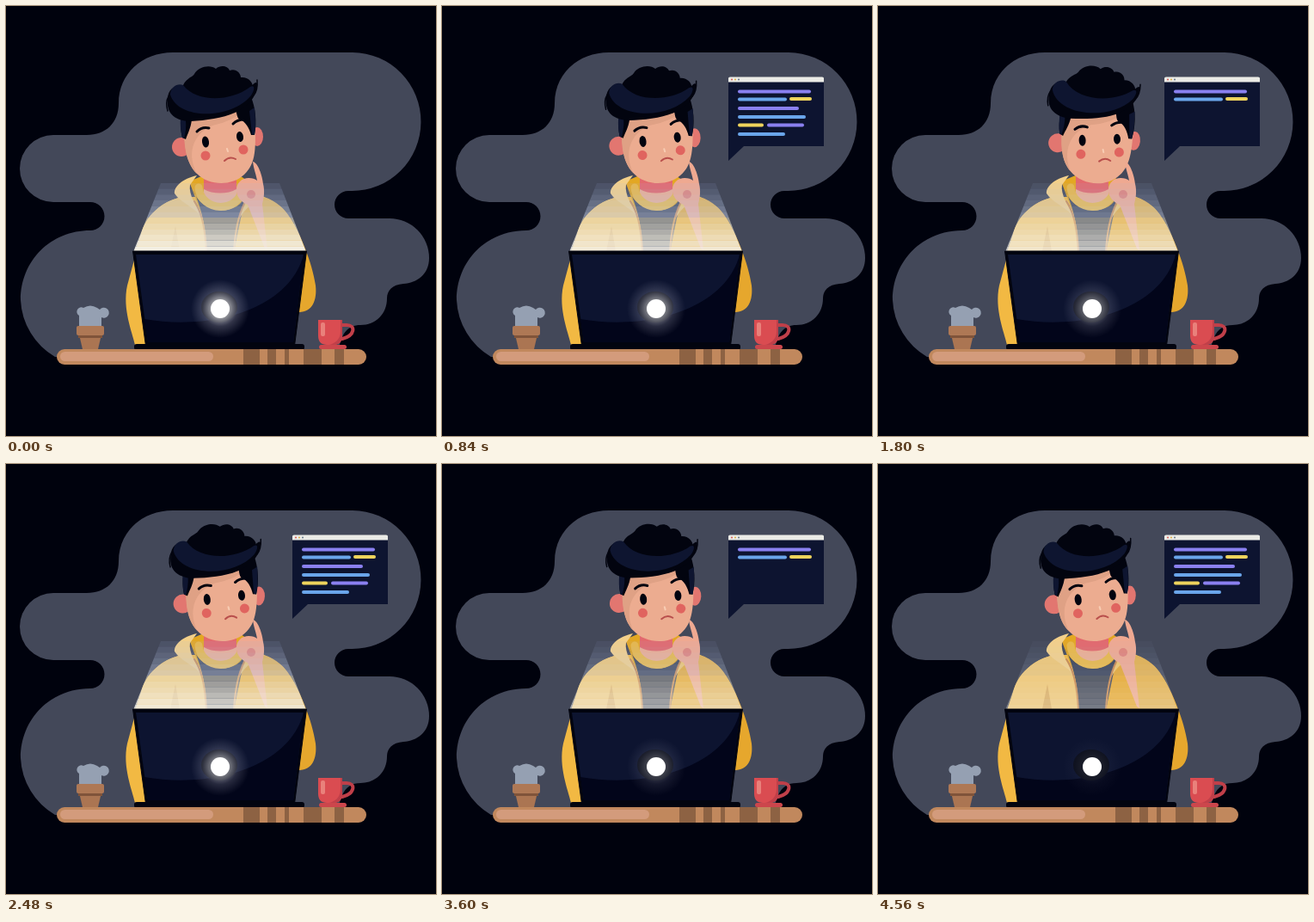
An HTML page for the animation above (4800 ms loop, 500 by 500 pixels).

```html
<!DOCTYPE html>
<html lang="en">
<head>
<meta charset="utf-8">
<title>Thinking at the laptop</title>
<style>
  html, body { margin: 0; width: 100%; height: 100%; overflow: hidden; background: #00020d; }
  svg { display: block; width: 100vw; height: 100vh; }
  .line { fill: none; stroke-linecap: round; }
</style>
</head>
<body>
<svg viewBox="0 0 500 500">
  <defs>
    <radialGradient id="halo">
      <stop offset=".3" stop-color="#fff" stop-opacity=".6"/>
      <stop offset=".6" stop-color="#dde" stop-opacity=".22"/>
      <stop offset="1" stop-color="#ccd" stop-opacity="0"/>
    </radialGradient>
    <clipPath id="cone"><path d="M180 206H318L349 286H148Z"/></clipPath>
  </defs>

  <path fill="#434859" d="M194 54H403A80 80.5 0 0 1 402 215H398A16 16 0 0 0 398 247H446A46 46 0 0 1 492 293C492 312 478 322 462 323C449 324 443 331 443 340C443 358 430 371 412 371C398 371 388 380 386 408H57A81 81 0 0 1 17 342C17 296 52 261 98 261A16.5 16.5 0 0 0 98 228H55A39 39 0 0 1 55 150H94C116 150 131 136 131 113C131 79 158 54 194 54Z"/>

  <g id="body">
    <path fill="#f2b943" d="M205 222C185 226 165 240 158 262L141 325C135 352 147 380 150 394H166L154 300H300V222Z"/>
    <path fill="#e6a72d" d="M285 217C305 222 322 232 330 246C342 264 356 298 360 325C362 342 356 356 341 356L335 300H262L272 230Z"/>
    <path fill="#efc673" d="M205 222C185 226 165 240 158 262L150 286H234L228 244Z"/>
    <path fill="#e3b04d" d="M300 222C315 227 324 236 330 246C337 256 343 270 347 286H304L297 232Z"/>
    <path fill="#d7a85a" d="M191 285L197 256L202 285Z"/>
    <path fill="#e3a723" d="M213 204L232 196H270L288 208L280 236H225Z"/>
    <path fill="#394156" d="M218 214C226 243 272 246 279 218L265 286H233C233 262 229 240 218 214Z"/>
    <path fill="#ecae92" d="M230 198H268V220C262 233 237 233 230 220Z"/>
    <path fill="#e2696d" d="M230 198H268V213C258 219 240 219 230 213Z"/>
    <path class="line" stroke="#e9b848" stroke-width="9" d="M224 211C227 240 271 242 275 211"/>
    <path fill="#f3d08a" d="M222 197C205 201 195 210 196 218C203 229 221 235 228 246C221 232 212 219 214 208Z"/>
    <path fill="#f0c56a" d="M282 221L301 222C286 228 276 238 271 248C273 237 276 228 282 221Z"/>
    <path class="line" stroke="#c7854c" stroke-width="2" d="M219 227Q231 244 233 286M277 230Q267 250 265 286"/>
  </g>

  <g id="head">
    <circle cx="204" cy="164" r="11" fill="#e27670"/>
    <ellipse cx="292" cy="152" rx="7" ry="11" fill="#e27670"/>
    <path fill="#ecac90" d="M206 138C209 160 207 180 222 195C236 209 262 210 277 196C291 183 291 165 289 128L270 113L212 126Z"/>
    <path fill="#dfa185" d="M206 138C208 160 207 180 222 195C211 174 215 150 240 139Q264 134 279 120L268 113L212 126Z"/>
    <path fill="#02040f" d="M203 124L216 132C215 142 211 149 209 155L205 153C203 145 203 138 203 124ZM264 118C270 122 267 130 272 132C278 134 283 142 285 150L289 150C292 135 290 118 285 106Z"/>
    <path fill="#0e1530" d="M203 130L209 133Q210 144 207 154L205 153Q202 142 203 130ZM283 122L289 118Q291 136 289 150L286 149Z"/>
    <path fill="#02040f" d="M204 100C206 84 216 84 219 79C224 70 238 68 244 73C250 68 258 70 260 75C267 72 273 78 273 83C281 82 287 88 287 94L280 115H205Z"/>
    <path fill="#02040f" d="M188 108C186 122 194 134 215 134C250 132 291 124 292 90C290 87 288 91 284 94C260 112 225 114 205 92C195 92 188 98 188 108Z"/>
    <path fill="#0e1530" d="M191 103C191 94 200 89 206 92C222 113 262 111 284 94C290 91 289 98 285 104C262 132 200 133 191 103Z"/>
    <path class="line" stroke="#02040f" stroke-width="1.5" d="M188 122Q185 112 189 105M288 104Q293 98 292 86"/>
    <g fill="#02040f">
      <ellipse cx="232" cy="158" rx="4" ry="6.5" transform="rotate(-8 232 158)"/>
      <ellipse cx="272" cy="152" rx="4" ry="6" transform="rotate(-8 272 152)"/>
    </g>
    <path class="line" stroke="#02040f" stroke-width="3" d="M222 146Q228 140 236 142M264 137Q269 132 277 132"/>
    <circle cx="232" cy="174" r="5.5" fill="#e0645f"/>
    <circle cx="276" cy="167" r="5.5" fill="#e0645f"/>
    <path class="line" stroke="#f8cdb4" stroke-width="2" d="M257 166L258 169"/>
    <path class="line" stroke="#b94f4c" stroke-width="2" d="M254 180Q260 174 267 178"/>
  </g>

  <path fill="#efa991" d="M287 181C293 182 298 197 299 207C301 214 300 224 298 230L304 284L301 282L281 231C268 226 264 212 272 204C278 198 288 200 292 203C291 196 288 190 287 181Z"/>
  <circle cx="285" cy="219" r="5" fill="#e0847b"/>
  <g id="beam" clip-path="url(#cone)"></g>

  <g id="laptop">
    <path fill="#02040f" stroke="#02040f" stroke-linejoin="round" d="M147.5 285H349.5L335.5 395H162.5Z"/>
    <path fill="#0d1430" d="M151 289H346L334 391H165Z"/>
    <path fill="#02051a" d="M161 364C240 378 330 352 346 289L334 391H165Z"/>
    <rect x="149" y="393" width="198" height="7" rx="3" fill="#02040f"/>
    <ellipse cx="248" cy="350" rx="21" ry="18" fill="#0a0d1a"/>
    <circle id="glow" cx="249" cy="352" r="34" fill="url(#halo)"/>
    <circle cx="249" cy="352" r="11" fill="#fff"/>
  </g>

  <g id="table">
    <rect x="59" y="399" width="360" height="18" rx="9" fill="#c1885d"/>
    <rect x="63" y="402" width="178" height="11" rx="5.5" fill="#d39b7c"/>
    <path fill="#8d6243" d="M276 399h19v18h-19zM304 399h10v18h-10zM324 399h5v18h-5zM346 399h21v18h-21zM382 399h11v18h-11z"/>
  </g>

  <g id="plant">
    <path fill="#95a0b2" d="M85 372V360A5 5 0 1 1 90 351Q98 346 106 351L109 353A6 6 0 1 1 111 362V372Z"/>
    <path fill="#ab7552" d="M85 382H111L107 399H89Z"/>
    <rect x="84" y="382" width="28" height="4" fill="#80543a"/>
    <rect x="82" y="372" width="32" height="11" rx="2" fill="#ae7855"/>
  </g>

  <g id="cup">
    <path class="line" stroke="#c03f49" stroke-width="4" d="M390 371H396C407 371 406 383 391 387"/>
    <path fill="#da4c51" d="M363 365H391V383Q391 394 381 394H373Q363 394 363 383Z"/>
    <path fill="#c03f49" d="M389 365H391V383Q391 394 381 394H376Q389 390 389 378Z"/>
    <rect x="366" y="368" width="5" height="16" rx="2" fill="#e9817b"/>
    <rect x="364" y="394" width="32" height="5" rx="2.5" fill="#cc464c"/>
  </g>

  <g id="bubble">
    <path fill="#0d1430" d="M333 84H444V163H351L333 180Z"/>
    <path fill="#ebebe6" d="M333 88.5V84Q333 82.5 335 82.5H442Q444 82.5 444 84V88.5Z"/>
    <circle cx="337" cy="85.5" r="1" fill="#d95b55"/>
    <circle cx="341" cy="85.5" r="1" fill="#dfb045"/>
    <circle cx="345" cy="85.5" r="1" fill="#678"/>
  </g>
</svg>
<script>
const $ = id => document.getElementById(id);
const clamp = v => Math.max(0, Math.min(1, v));

function add(parent, tag, attrs) {
  const el = document.createElementNS('http://www.w3.org/2000/svg', tag);
  for (const key in attrs) el.setAttribute(key, attrs[key]);
  return parent.appendChild(el);
}

// Light from the screen, in bands that brighten towards the lid
const BANDS = 12;
for (let i = 0; i < BANDS; i++) {
  add($('beam'), 'rect', {
    x: 140, y: 206 + i * 80 / BANDS, width: 220, height: 80 / BANDS,
    fill: `hsl(${i < 6 ? 220 : 45} ${55 - i * 2}% ${76 + i * 1.6}%)`,
    opacity: 0.12 + 0.84 * i / (BANDS - 1)
  });
}

const [purple, blue, yellow] = ['#8a80f0', '#6aa5ea', '#eed35c'];
const bars = [
  [99.5, 346, 427, purple], [108.5, 346, 399, blue], [108, 406, 428, yellow],
  [119, 346, 413, purple], [129, 346, 421, blue],
  [138.5, 346, 372, yellow], [138.5, 380, 419, purple], [149, 346, 397, blue]
].map(([y, x1, x2, stroke]) => ({
  x1, x2, el: add($('bubble'), 'line', { class: 'line', x1, x2, y1: y, y2: y, stroke, 'stroke-width': 4 })
}));

// [ms, value] keys, eased between neighbours
const tilt = [[0, 0], [840, 1.7], [1800, 6.2], [2300, 1.6], [2480, 2], [2800, 3.6], [3600, 2.4], [4560, 0.8]];
const light = [[0, 1], [840, 0.9], [1800, 0.78], [2480, 0.88], [2800, 0.78], [3600, 0.62], [4560, 0.35]];

function ease(keys, t) {
  const next = Math.max(1, keys.findIndex(key => key[0] >= t));
  const [t0, a] = keys[next - 1], [t1, b] = keys[next];
  const k = clamp((t - t0) / (t1 - t0));
  return a + (b - a) * k * k * (3 - 2 * k);
}

function popScale(t) {
  const k = clamp(t / 400) - 1;
  return 1 + 2.1 * k ** 3 + 1.1 * k ** 2;
}

function draw(now) {
  const t = Math.min(4560, Math.floor(now % 4800 / 40) * 40);
  $('head').setAttribute('transform', `rotate(${ease(tilt, t)} 250 209)`);
  const power = ease(light, t);
  $('beam').setAttribute('opacity', power);
  $('glow').setAttribute('opacity', power ** 2);
  $('bubble').setAttribute('transform', `translate(333 180) scale(${popScale(t)}) translate(-333 -180)`);

  const typed = (t + 240) % 1800 / 80;
  bars.forEach(({ x1, x2, el }, i) => {
    const k = clamp(typed - i);
    el.setAttribute('x2', x1 + (x2 - x1) * k);
    el.setAttribute('visibility', k ? 'visible' : 'hidden');
  });
  requestAnimationFrame(draw);
}
requestAnimationFrame(draw);
</script>
</body>
</html>
```
